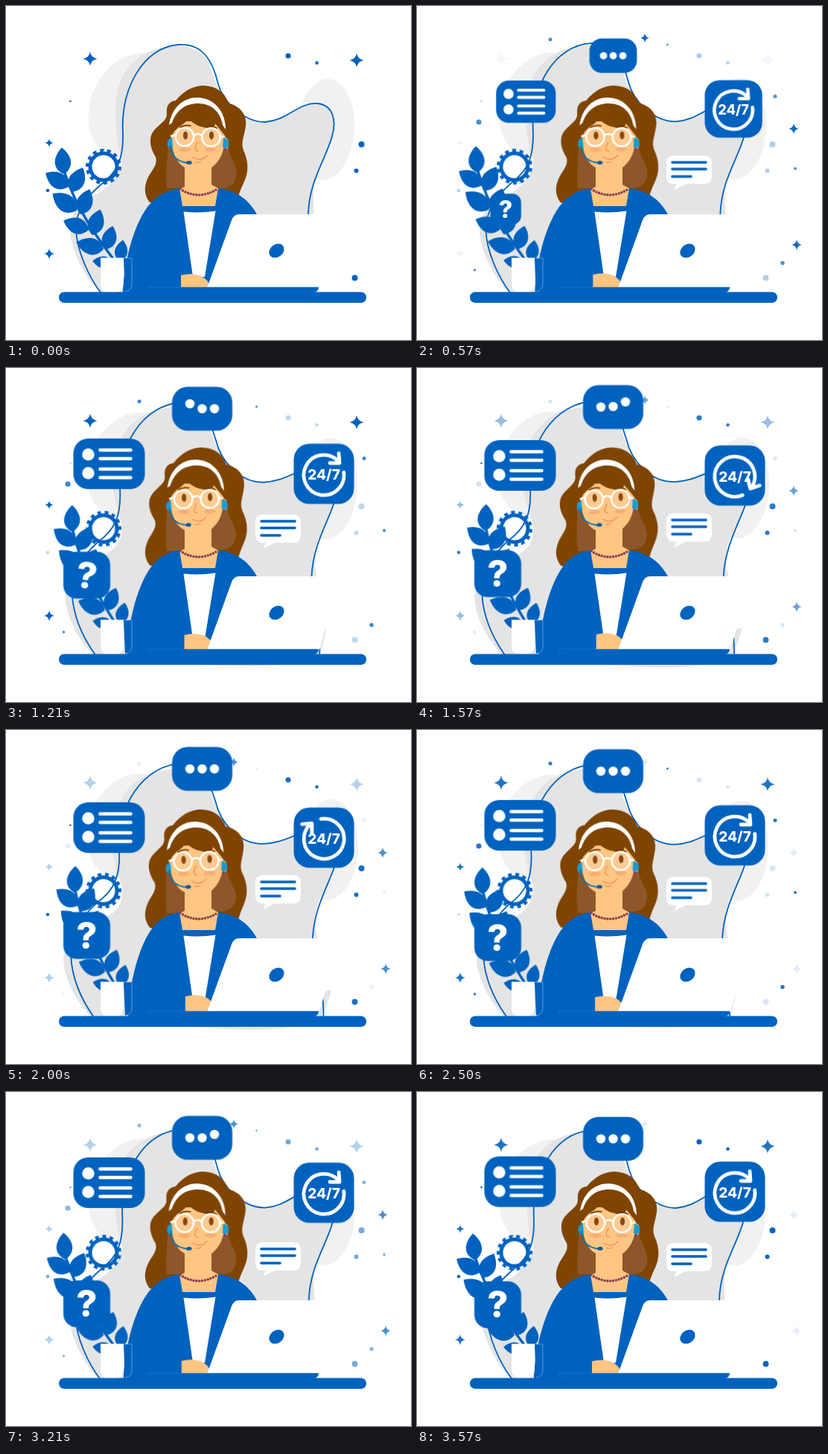
Write an HTML page without scripts that moves like this. It is 544 by 449 pixels and loops after 3.64 s.

```html
<!DOCTYPE html>
<html lang="en">
<head>
<meta charset="utf-8">
<title>Support desk</title>
<style>
  html, body { margin: 0; width: 100%; height: 100%; overflow: hidden; background: #fff; }
  svg { display: block; width: 544px; height: 449px; }

  :root { --blue: #0062bf; --skin: #fec583; --hair: #7f4400; --sine: cubic-bezier(.37, 0, .63, 1); }
  .blue { fill: var(--blue); }
  .skin { fill: var(--skin); }
  .hair { fill: var(--hair); }
  .white { fill: #fff; }
  .line { fill: none; stroke: var(--blue); stroke-linecap: round; stroke-linejoin: round; }
  .line.ink { stroke: #fff; }
  text { fill: #fff; font-family: Inter, "Open Sans", sans-serif; font-weight: 800; text-anchor: middle; }

  /* slow sway: half a loop out, half a loop back */
  .blob, .outline, .jacket, .drift, .bob, .plant, .head, .hand {
    animation: 1820ms var(--sine) infinite alternate;
  }
  .blob { animation-name: blob; }
  .outline { animation-name: outline; }
  .jacket { animation-name: jacket; }
  .drift { animation-name: drift; }
  .bob { animation-name: bob; }
  .plant { animation-name: sway; transform-origin: 148px 345px; }
  .head { animation-name: tilt; transform-origin: 258px 245px; }
  .hand { animation-name: reach; }

  @keyframes drift { to { transform: translate(var(--x), -5px); } }
  @keyframes bob { to { transform: translateY(var(--y)); } }
  @keyframes sway { to { transform: rotate(6.8deg); } }
  @keyframes tilt { to { transform: rotate(-2deg); } }
  @keyframes reach { to { transform: translate(6px, -4px); } }
  @keyframes blob {
    from { d: path("M127 385C108 370 92 335 87 312C82 285 95 270 112 258C140 245 158 222 156 205C150 190 147 165 147 140C147 100 165 70 200 58C225 50 262 50 274 80C282 110 300 153 345 156C380 154 395 130 420 132C438 133 446 150 439 174C430 200 413 220 413 255C413 285 414 310 414 330C414 360 414 380 414 385C360 395 300 396 240 395Z"); }
    to { d: path("M113 385C95 365 77 335 77 308C78 285 95 268 118 257C150 250 160 232 155 208C147 185 140 160 141 138C145 100 165 65 202 56C230 48 262 52 274 80C282 110 300 150 345 153C375 152 390 132 418 134C440 140 446 160 441 185C430 215 414 230 415 262C420 300 440 330 437 352C432 372 425 380 425 385C400 406 330 406 240 398Z"); }
  }
  @keyframes outline {
    from { d: path("M127 385C112 365 95 330 94 300C94 275 108 256 130 238C150 222 158 205 157 170C154 110 185 55 232 52C265 50 278 75 285 105C292 130 320 156 348 156C378 154 392 130 418 131C440 133 444 155 438 175C430 205 407 235 406 280C406 300 404 330 404 384"); }
    to { d: path("M117 385C101 362 89 337 87 305C86 275 102 250 122 232C146 215 153 195 152 165C147 105 182 46 240 44C262 44 272 66 281 95C288 125 312 153 345 153C378 152 395 133 420 136C440 142 448 165 441 185C433 208 414 240 412 280C412 310 428 340 427 384"); }
  }
  @keyframes jacket {
    from { d: path("M157 386C158 350 169 299 190 270C203 253 219 247 233 245L237 269H281L285 245C311 248 328 262 338 282L300 386Z"); }
    to { d: path("M164 386C165 350 175 299 194 270C205 253 219 247 233 245L237 269H281L285 245C311 248 328 262 338 282L300 386Z"); }
  }

  /* icons pop up one after another and vanish at the loop point */
  .pop { animation: 3640ms var(--sine) infinite; }
  .chat { animation-name: pop-chat; transform-origin: 345px 247px; }
  .clock { animation-name: pop-clock; transform-origin: -40px 40px; }
  .list { animation-name: pop-list; transform-origin: 47px 34px; }
  .talk { animation-name: pop-talk; transform-origin: 0 29px; }
  .ask { animation-name: pop-ask; transform-origin: 31px -31px; }
  @keyframes pop-chat { 0%, .6% { transform: scale(0); } 14%, 100% { transform: none; } }
  @keyframes pop-clock { 0%, 3.9% { transform: scale(0); } 17.6%, 100% { transform: none; } }
  @keyframes pop-list { 0%, 5.6% { transform: scale(0); } 19.4%, 100% { transform: none; } }
  @keyframes pop-talk { 0%, 6.2% { transform: scale(0); } 19.9%, 100% { transform: none; } }
  @keyframes pop-ask { 0%, 7.4% { transform: scale(0); } 21.2%, 100% { transform: none; } }

  .turn { animation: turn 3640ms var(--sine) infinite; }
  @keyframes turn { 0%, 33.2% { transform: none; } 66%, 100% { transform: rotate(360deg); } }
  .gear { animation: spin 3640ms linear infinite; }
  @keyframes spin { to { transform: rotate(360deg); } }
  .hop { animation: hop 3640ms var(--sine) infinite; }
  @keyframes hop { 0%, 29%, 40%, 72%, 83%, 100% { transform: none; } 34%, 77% { transform: translateY(-7px); } }
  .wobble { animation: wobble 3640ms var(--sine) infinite; }
  @keyframes wobble { 0%, 27%, 41%, 100% { transform: none; } 33% { transform: rotate(7deg); } 37% { transform: rotate(-7deg); } }

  .fade { animation: fade 606.67ms linear infinite alternate; }
  .slow { animation-duration: 910ms; animation-timing-function: var(--sine); }
  .late { animation-direction: alternate-reverse; }
  @keyframes fade { from { opacity: 1; } to { opacity: 0; } }
</style>
</head>
<body>
<svg viewBox="0 0 544 449">
  <defs>
    <path id="star" d="M0-1Q.15-.15 1 0Q.15.15 0 1Q-.15.15-1 0Q-.15-.15 0-1Z"/>
    <path id="leaf" d="M0 0C-15-8-14-23 0-36C14-23 14-8 0 0Z"/>
  </defs>

  <g fill="#f1f1f1">
    <g class="drift" style="--x:-3px"><ellipse rx="55" ry="73" transform="translate(169 134) rotate(24)"/></g>
    <g class="drift" style="--x:5px"><ellipse rx="39" ry="68" transform="translate(429 166) rotate(4)"/></g>
  </g>
  <path class="blob" fill="#e4e4e4"/>

  <g class="blue">
    <g class="fade">
      <use href="#star" transform="translate(113 71) scale(9.5)"/>
      <use href="#star" transform="translate(471 73) scale(9.5)"/>
      <use href="#star" transform="translate(58 184) scale(5.5)"/>
      <use href="#star" transform="translate(58 333) scale(7)"/>
    </g>
    <g class="fade late">
      <use href="#star" transform="translate(306 43) scale(6)"/>
      <use href="#star" transform="translate(506 165) scale(7)"/>
      <use href="#star" transform="translate(510 321) scale(7)"/>
    </g>
    <g class="fade slow">
      <circle cx="379" cy="67" r="3.6"/><circle cx="417.5" cy="76.5" r="2.3"/>
      <circle cx="86.5" cy="128" r="1.3"/><circle cx="477.5" cy="186" r="4"/>
      <circle cx="470.5" cy="221.5" r="3"/><circle cx="56" cy="248" r="2.3"/>
      <circle cx="468.5" cy="365.5" r="3.9"/>
    </g>
    <g class="fade slow late">
      <circle cx="179" cy="45" r="2.5"/><circle cx="336.5" cy="52" r="1.4"/>
      <circle cx="83" cy="156" r="3.6"/><circle cx="481" cy="121.5" r="2.5"/>
      <circle cx="508" cy="218.5" r="2"/><circle cx="491" cy="345.5" r="2.7"/>
      <circle cx="77.5" cy="355" r="1.7"/>
    </g>
  </g>

  <g transform="translate(131 216)">
    <g class="gear">
      <circle class="white" r="18"/>
      <circle class="line" r="18" stroke-width="5"/>
      <circle class="line" r="21.5" stroke-width="5" pathLength="28" stroke-dasharray="1" style="stroke-linecap:butt"/>
    </g>
  </g>
  <path class="outline line" stroke-width="1.8"/>

  <g class="plant blue">
    <path class="line" d="M148 345C125 315 95 275 78 222" stroke-width="3.5"/>
    <use href="#leaf" transform="translate(78 226) rotate(-5)"/>
    <use href="#leaf" transform="translate(84 243) rotate(-59)"/>
    <use href="#leaf" transform="translate(88 250) rotate(25)"/>
    <use href="#leaf" transform="translate(95 275) rotate(-55) scale(1.1)"/>
    <use href="#leaf" transform="translate(100 280) rotate(20)"/>
    <use href="#leaf" transform="translate(111 301) rotate(-70)"/>
    <use href="#leaf" transform="translate(116 308) rotate(17)"/>
    <use href="#leaf" transform="translate(131 327) rotate(-76) scale(1.05)"/>
    <use href="#leaf" transform="translate(135 327) rotate(15) scale(.9)"/>
    <use href="#leaf" transform="translate(153 343) rotate(8) scale(.8)"/>
    <use href="#leaf" transform="translate(143 346) rotate(-83) scale(.75)"/>
  </g>

  <!-- back hair -->
  <g class="head">
    <path class="hair" d="M228 127C240 113 252 107 266 107C283 108 294 116 299 131C314 134 324 146 322 161C320 176 315 184 319 194C326 209 326 223 320 236C315 247 312 254 310 264H193C184 252 186 241 191 230C197 219 204 213 201 203C193 190 191 176 199 167C209 156 216 154 216 145C215 134 219 128 228 127Z"/>
    <path fill="#8d572b" d="M218 183C217 205 214 222 216 245H289C303 246 312 235 309 219C305 206 298 199 298 184Z"/>
  </g>

  <!-- body -->
  <path class="skin" d="M240 200H276V240L288 247L282 272H236L232 247L240 243Z"/>
  <path class="jacket blue"/>
  <path class="white" d="M238.500 276.500Q260 279 281.500 275.500L267 364H251Z"/>
  <path d="M234 246Q258 262 284 246" fill="none" stroke="#8c4050" stroke-width="3.600" stroke-linecap="round" stroke-dasharray="0 3.900"/>
  <path class="hand skin" d="M235 384V362Q250 358 262 363Q271 367 274 377V384Z"/>

  <!-- face -->
  <g class="head">
    <path class="skin" d="M223 155C219 188 226 209 240 217C254 227 268 225 280 214C292 203 297 182 294 155Z"/>
    <ellipse class="skin" cx="295" cy="185" rx="4" ry="8"/>
    <path class="hair" d="M218 184C218 142 238 127 258 127C284 128 297 148 297 178C292 172 288 166 281 158C281 161 279 163 276 164C263 164 252 160 245 151C240 160 229 162 224 172Z"/>
    <path class="white" d="M219 160C223 136 238 123 258 123C280 124 295 142 295 166L291 160C288 143 277 131 258 131C241 131 229 140 223 157Z"/>
    <g fill="#f9ad74">
      <ellipse cx="240" cy="193" rx="8" ry="3"/><ellipse cx="275" cy="193" rx="8" ry="3"/>
    </g>
    <g fill="#fecb91" stroke="#fff" stroke-width="2.500">
      <circle cx="240" cy="176" r="12.200"/><circle cx="275.500" cy="176.500" r="12.200"/>
      <path d="M252 174Q258 170 263 174M228 173L221 175M287 174L293 177" fill="none"/>
    </g>
    <g fill="#854a16">
      <ellipse cx="241" cy="174" rx="3.100" ry="5.400"/><ellipse cx="276" cy="174" rx="3.100" ry="5.400"/>
    </g>
    <g fill="none" stroke-linecap="round" stroke-width="1.600">
      <path d="M234 163Q241 159 248 161M268 163Q276 160 283 164" stroke="#703a00"/>
      <path d="M257 183Q251 195 258 195M251 203Q261 210 270 201M255 210Q259 211 262 209" stroke="#ef9555" stroke-width="1.500"/>
    </g>
    <path fill="#139dd4" d="M223 177Q215 179 217 188Q219 193 224 190ZM292 177Q301 179 299 188Q297 193 291 190Z"/>
    <circle cx="294" cy="193" r="2.200" fill="#8c4050"/>
    <path d="M221 187C221 201 229 209 244 211" fill="none" stroke="#0872ae" stroke-width="1.800"/>
    <ellipse cx="246" cy="210.500" rx="3.700" ry="2.500" fill="#075c9c"/>
  </g>

  <!-- desk -->
  <path class="white" d="M313 280H436Q444 280 442 288L438 349L429 351L421 379H270L303 288Q306 280 313 280Z"/>
  <ellipse class="blue" rx="11" ry="8.500" transform="translate(363.500 329) rotate(-38)"/>
  <path class="blue" d="M191 378H420Q419 385 413 385H198Q192 385 191 378Z" stroke="#3480cc" stroke-width=".5"/>
  <path d="M158 339H169V375Q168 383 160 384" fill="#0062bf" stroke="#7fb0df" stroke-width=".7"/>
  <path class="white" d="M127 338.500H158V371Q158 385 145 385H139Q127 385 127 373Z"/>
  <rect class="blue" x="71" y="384.500" width="413" height="14.500" rx="7.200"/>

  <!-- icons -->
  <g class="bob" style="--y:-8px"><g class="pop chat">
    <path class="white" d="M345 203H386Q396 203 396 213V231Q396 241 386 241H361L345 249L349 241H345Q335 241 335 231V213Q335 203 345 203Z"/>
    <path class="line" d="M343 212H388M343 221H388M343 231H368" stroke-width="3.600"/>
  </g></g>

  <g transform="translate(427 134)">
    <g class="bob" style="--y:11px"><g class="pop clock">
      <rect class="blue" x="-40.500" y="-40.500" width="81" height="81" rx="21"/>
      <g transform="translate(0 1.500)">
        <path class="turn line ink" d="M26.700-3.600A27 27 0 1 1 19-19M20-29L21-16L8-16" stroke-width="4.800"/>
        <text y="6.500" font-size="19">24/7</text>
      </g>
    </g></g>
  </g>

  <g transform="translate(138.500 120.500)">
    <g class="bob" style="--y:11px"><g class="pop list">
      <rect class="blue" x="-48" y="-34" width="96" height="68" rx="20"/>
      <circle class="white" cx="-28" cy="-12.500" r="8.200"/>
      <circle class="white" cx="-28" cy="12.500" r="8.200"/>
      <path class="line ink" d="M-12-18.500H29M-12-7H29M-12 7H29M-12 18.500H29" stroke-width="4.600"/>
    </g></g>
  </g>

  <g transform="translate(263.500 63)">
    <g class="bob" style="--y:-11px"><g class="pop talk white">
      <rect class="blue" x="-40.500" y="-29.500" width="81" height="59" rx="21"/>
      <circle class="hop" cx="-16.500" r="6.200"/>
      <circle class="hop" r="6.200" style="animation-delay:160ms"/>
      <circle class="hop" cx="16.500" r="6.200" style="animation-delay:320ms"/>
    </g></g>
  </g>

  <g transform="translate(108.500 286)">
    <g class="bob" style="--y:-10px"><g class="pop ask">
      <rect class="blue" x="-31.500" y="-31.500" width="63" height="63" rx="18"/>
      <text class="wobble" y="17.500" font-size="49" font-weight="900">?</text>
    </g></g>
  </g>
</svg>
</body>
</html>
```
